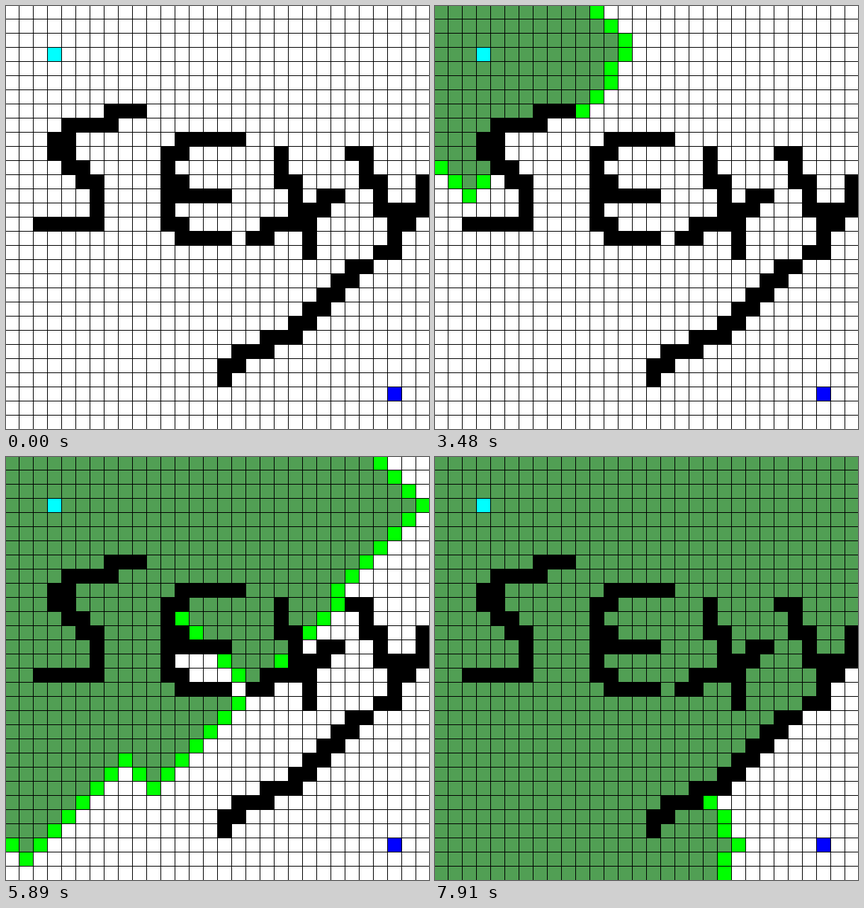
An HTML page with a canvas that plays this animation: 597 by 598 pixels, repeating every 8000 ms.

```html
<!DOCTYPE html>
<html lang="en">
<head>
<meta charset="utf-8">
<title>Grid search</title>
<style>
  html, body { margin: 0; width: 100%; height: 100%; overflow: hidden; background: #fff; }
  canvas { display: block; }
</style>
</head>
<body>
<canvas id="stage" width="597" height="598"></canvas>
<script>
const ctx = document.getElementById('stage').getContext('2d');
const LOOP = 8000, REDRAW = 60, SIZE = 30, CELL = 20;
const START = [3, 3], GOAL = [27, 27];
const OPEN = '#00ff00', CLOSED = '#519f54';

// Corner points of the hand-drawn walls.
const strokes = [
  '9,7 7,7 7,8 4,8 3,9 6,12 6,15 2,15',
  '16,9 12,9 11,10 11,15 12,15 12,16 15,16',
  '15,13 12,13 12,12',
  '19,10 20,14 21,14 21,17',
  '23,13 22,13 21,15 18,15 17,16',
  '24,10 25,10 26,14 29,14 29,12',
  '28,15 27,15 27,17 26,17',
  '15,26 16,24 20,23 25,18'
];

// The cell the search expands next at a few moments.
const keys = [
  { time: 2660, cell: [1, 3] },
  { time: 3480, cell: [12, 4] },
  { time: 4780, cell: [3, 20] },
  { time: 5890, cell: [23, 9] },
  { time: 7190, cell: [20, 18] },
  { time: 7910, cell: [20, 26] }
];

const id = ([x, y]) => y * SIZE + x;

// Staircase of side-by-side cells between two points.
function staircase([x0, y0], [x1, y1]) {
  const dx = Math.abs(x1 - x0), dy = Math.abs(y1 - y0);
  const cells = [[x0, y0]];
  for (let i = 0, j = 0; i < dx || j < dy;) {
    if ((i + 0.5) * dy < (j + 0.5) * dx) i++; else j++;
    cells.push([x0 + i * Math.sign(x1 - x0), y0 + j * Math.sign(y1 - y0)]);
  }
  return cells;
}

const walls = strokes.flatMap(stroke => {
  const points = stroke.split(' ').map(p => p.split(',').map(Number));
  return points.slice(1).flatMap((point, i) => staircase(points[i], point));
});
const blocked = new Set(walls.map(id));

const neighbours = ([x, y]) => [[x - 1, y], [x, y - 1], [x, y + 1], [x + 1, y]]
  .filter(c => c.every(v => v >= 0 && v < SIZE) && !blocked.has(id(c)));

// Cells are expanded by distance; ties go by column, then by row.
function searchOrder() {
  const distance = new Map([[id(START), 0]]);
  const cells = [START];
  for (const cell of cells) {
    for (const next of neighbours(cell)) {
      if (distance.has(id(next))) continue;
      distance.set(id(next), distance.get(id(cell)) + 1);
      cells.push(next);
    }
  }
  return cells.sort((a, b) =>
    distance.get(id(a)) - distance.get(id(b)) || a[0] - b[0] || a[1] - b[1]);
}

const order = searchOrder();
for (const key of keys) key.count = order.findIndex(c => id(c) === id(key.cell));

function expandedCount(t) {
  const next = keys.findIndex(key => key.time > t);
  if (next === 0) return 0;
  if (next < 0) return keys[keys.length - 1].count;
  const a = keys[next - 1], b = keys[next];
  const elapsed = Math.floor((t - a.time) / REDRAW) * REDRAW;
  return Math.floor(a.count + (b.count - a.count) * elapsed / (b.time - a.time));
}

function fill(cells, color) {
  ctx.fillStyle = color;
  for (const [x, y] of cells) ctx.fillRect(x * CELL - 1, y * CELL - 1, CELL, CELL);
}

function draw(t) {
  const expanded = order.slice(0, expandedCount(t));
  ctx.fillStyle = '#fff';
  ctx.fillRect(0, 0, 597, 598);
  fill(expanded.flatMap(neighbours), OPEN);
  fill(expanded, CLOSED);
  fill([START], '#00ffff');
  fill([GOAL], '#0000ff');
  fill(walls, '#000');
  for (let p = CELL - 2; p < 598; p += CELL) {
    ctx.fillRect(p, 0, 1, 598);
    ctx.fillRect(0, p, 597, 1);
  }
}

const begin = performance.now();
function tick() {
  draw((performance.now() - begin) % LOOP);
  requestAnimationFrame(tick);
}
tick();
</script>
</body>
</html>
```
